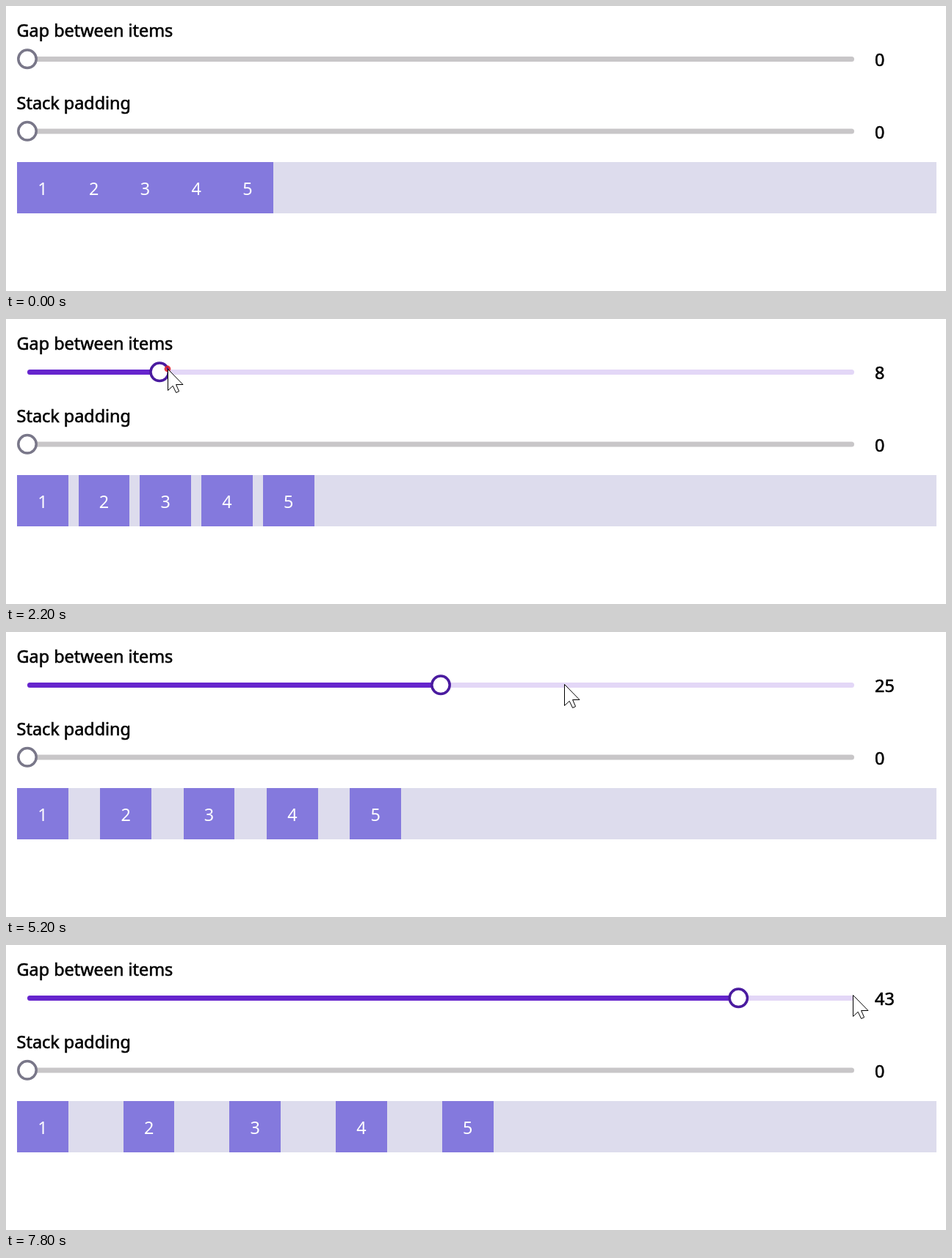
Write an HTML page that moves like this. It is 1280x389 px and loops after 8 s.

```html
<!DOCTYPE html>
<html lang="en">
<head>
<meta charset="utf-8">
<title>Stack spacing</title>
<style>
  html, body { margin: 0; width: 100%; height: 100%; overflow: hidden; background: #fff; }
  svg { display: block; width: 1280px; height: 389px; }
  text { font: 400 23.4px "Noto Sans", "Open Sans", sans-serif; fill: #000; stroke: #000; stroke-width: .6; }
  rect { shape-rendering: crispEdges; }
  .item rect { fill: #8479dd; }
  .item text { fill: #fff; stroke: none; text-anchor: middle; }
  .track, .fill { stroke-width: 7; stroke-linecap: round; }
  .track { stroke: #c8c6c8; }
  .fill { stroke: #6625cd; }
  .thumb { fill: #fff; stroke: #797789; stroke-width: 3.5; }
  .hover .track { stroke: #e3d7f7; }
  .hover .thumb { stroke: #4a1b9f; }
  #ring { fill: none; stroke: #e0202c; stroke-width: 3; }
  #arrow { fill: #fff; stroke: #000; }
</style>
</head>
<body>
<svg viewBox="0 0 1280 389">
  <text x="14.6" y="42">Gap between items</text>
  <g id="gap">
    <path class="track" d="M32.5 72.4H1151.5"/>
    <path class="fill" id="fill"/>
    <circle class="thumb" id="thumb" cy="72.3" r="12.2"/>
    <text id="value" x="1183" y="82"></text>
  </g>
  <text x="14.6" y="140.5">Stack padding</text>
  <path class="track" d="M32.5 170.9H1151.5"/>
  <circle class="thumb" cx="29" cy="170.8" r="12.2"/>
  <text x="1183" y="180.5">0</text>
  <rect x="15" y="213" width="1252" height="69.75" fill="#dddced"/>
  <g id="items"></g>
  <circle id="ring"/>
  <path id="arrow" d="M.5 .5V29.5L7.2 23.3L11.6 32.5L15.6 30.7L11.6 21.5H21Z"/>
</svg>
<script>
const $ = id => document.getElementById(id);
const LOOP = 8000, STEP = 200;
const UNIT = 1.7436, BOX = 40 * UNIT;
const SLIDER_X = 29, NOTCH = 22.52;
const LAYOUT_LAG = 20, RING_LIFE = 260;

// The cursor reaches each stop, rests, then leaves; a click comes just before leaving.
const stops = [
  { arrive: 400, x: 150, y: 11, leave: 400 },
  { arrive: 1400, x: 101, y: 64, leave: 1650, click: true },
  { arrive: 2100, x: 220, y: 68, leave: 2405, click: true },
  { arrive: 2800, x: 361, y: 73, leave: 3410, click: true },
  { arrive: 4200, x: 598, y: 73, leave: 4810, click: true },
  { arrive: 5200, x: 760, y: 71, leave: 5670, click: true },
  { arrive: 5800, x: 1066, y: 75, leave: 6210 },
  { arrive: 6600, x: 997, y: 75, leave: 7010, click: true },
  { arrive: 7800, x: 1153, y: 68, leave: LOOP }
];
const clicks = stops.filter(s => s.click).map(s => ({
  time: s.leave - RING_LIFE,
  value: Math.round((s.x - SLIDER_X) / NOTCH)
}));

const items = [1, 2, 3, 4, 5].map(n => {
  const g = document.createElementNS("http://www.w3.org/2000/svg", "g");
  g.setAttribute("class", "item");
  g.innerHTML = `<rect y="213" width="${BOX}" height="${BOX}"/><text x="${BOX / 2}" y="258">${n}</text>`;
  $("items").append(g);
  return g;
});

const easeOut = k => 1 - (1 - k) ** 3;

function cursorAt(t) {
  const i = Math.max(1, stops.findIndex(s => t < s.leave));
  const from = stops[i - 1], to = stops[i];
  const k = (t - from.leave) / (to.arrive - from.leave);
  const e = easeOut(Math.min(1, Math.max(0, k)));
  const mix = axis => Math.round(from[axis] + (to[axis] - from[axis]) * e);
  return [mix("x"), mix("y")];
}

const lastClick = t => clicks.filter(c => c.time <= t).pop() || { time: -LOOP, value: 0 };

function set(el, attrs) {
  for (const name in attrs) el.setAttribute(name, attrs[name]);
}

function draw(t) {
  const { time, value } = lastClick(t);
  const gap = lastClick(t - LAYOUT_LAG).value;
  const thumbX = SLIDER_X + value * NOTCH;
  const [x, y] = cursorAt(t);
  const age = t - time;

  set($("gap"), { class: y > 50 ? "hover" : "" });
  set($("thumb"), { cx: thumbX });
  set($("fill"), { d: value ? `M32.5 72.4H${thumbX}` : "" });
  $("value").textContent = value;
  items.forEach((g, i) =>
    set(g, { transform: `translate(${15 + i * (BOX + gap * UNIT)} 0)` }));

  set($("arrow"), {
    transform: `translate(${x} ${y})`,
    visibility: t < stops[0].arrive ? "hidden" : "visible"
  });
  set($("ring"), {
    cx: x, cy: y,
    r: Math.max(0, age * 0.08 - 1.5),
    opacity: 1 - 0.6 * age / RING_LIFE,
    visibility: age < RING_LIFE ? "visible" : "hidden"
  });
}

function tick() {
  const t = performance.now() % LOOP;
  draw(Math.floor(t / STEP) * STEP);
  requestAnimationFrame(tick);
}
tick();
</script>
</body>
</html>
```
